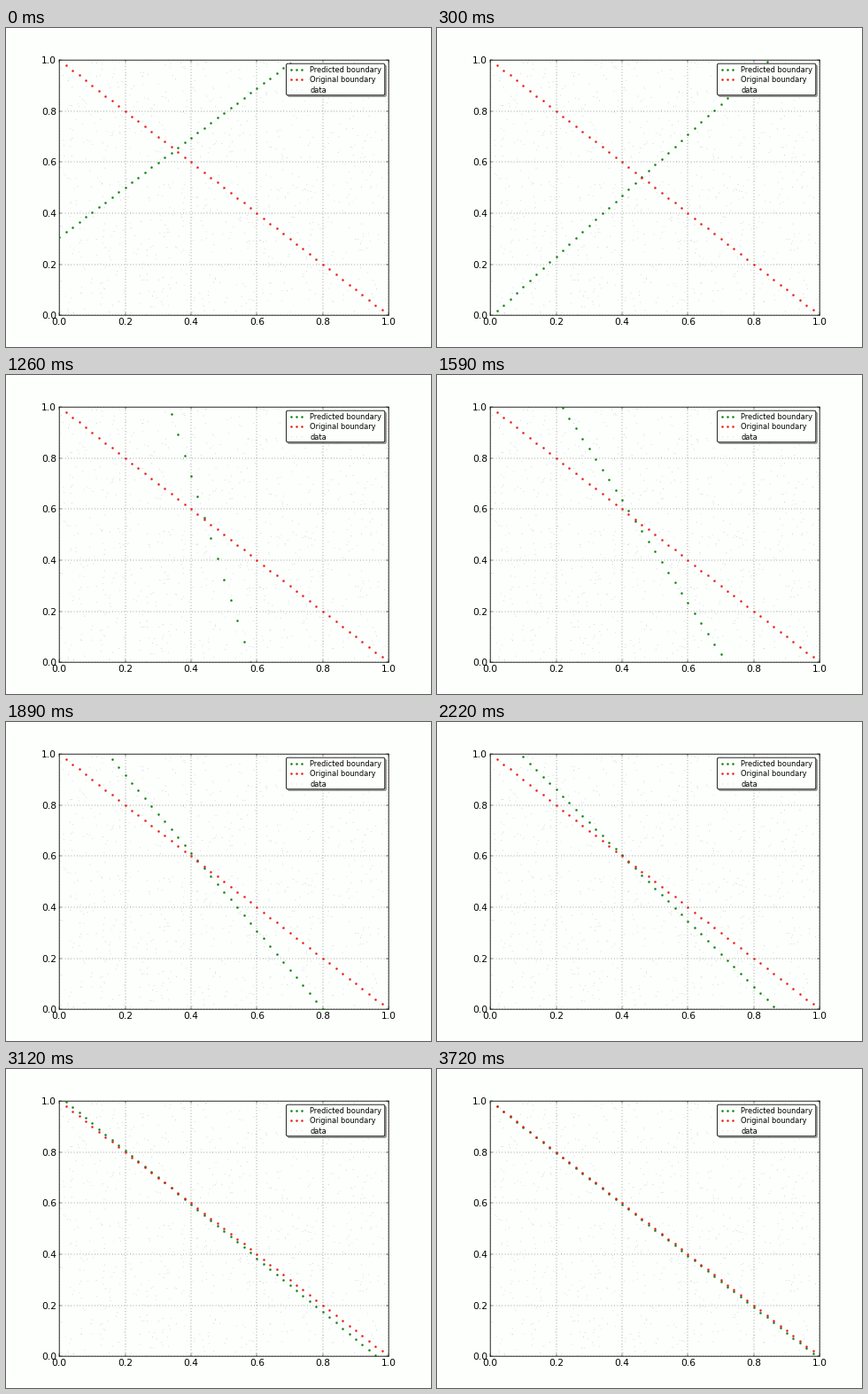
Animation of 480x360 px, one loop 3750 ms. Source, as a matplotlib script:

```python
import numpy as np
import matplotlib.pyplot as plt
from matplotlib.animation import FuncAnimation
from matplotlib.patches import FancyBboxPatch

plt.rcParams.update({
    "font.family": "DejaVu Sans",
    "lines.scale_dashes": False,
    "axes.linewidth": 1.0,
    "toolbar": "None",
})

W, H, DPI = 480, 360, 60
FRAMES, INTERVAL = 125, 30
PAPER = "#fdfffc"
GREEN, RED, PALE_BLUE = "#0a7f0c", "#ec1616", "#b8b8f0"
DOT = dict(linestyle="none", marker=".", markersize=4.8, markeredgewidth=0.5)

# Boundary bias + x + tilt * y = 0, sampled at a few steps of the training
STEPS = np.array([0, 10, 28, 53, 74, 104, 124.0])
BIAS = np.array([0.316, -0.006, -0.359, -0.7155, -0.869, -0.964, -0.991])
TILT = np.array([-1.029, -0.838, -0.1664, 0.497, 0.7776, 0.947, 0.992])

rng = np.random.default_rng(7)


def smooth(t, values):
    """Cubic Hermite curve through the sampled steps."""
    slopes = np.gradient(values, STEPS, edge_order=2)
    i = min(np.searchsorted(STEPS, t, side="right") - 1, len(STEPS) - 2)
    h = STEPS[i + 1] - STEPS[i]
    u = (t - STEPS[i]) / h
    return ((2 * u**3 - 3 * u**2 + 1) * values[i]
            + (u**3 - 2 * u**2 + u) * h * slopes[i]
            + (3 * u**2 - 2 * u**3) * values[i + 1]
            + (u**3 - u**2) * h * slopes[i + 1])


def specks(ax, x, y):
    sizes = rng.uniform(0.7, 1.2, len(x))
    ax.scatter(x, y, s=sizes, color=PALE_BLUE, linewidths=0, zorder=2)


def box(ax, x, y, w, h, **style):
    ax.add_patch(FancyBboxPatch(
        (x, y), w, h, boxstyle="round,pad=0,rounding_size=1.7", **style))


def draw_legend(fig):
    ax = fig.add_axes([0, 0, 1, 1], zorder=5)
    ax.set(xlim=(0, W), ylim=(H, 0))
    ax.axis("off")
    box(ax, 318.2, 41.9, 111.3, 35.6, facecolor="0.3", edgecolor="0.3",
        alpha=0.5, linewidth=1, zorder=0)
    box(ax, 316.5, 40.2, 111.3, 35.6, facecolor=PAPER, edgecolor="black",
        linewidth=1, zorder=1)

    xs = np.linspace(322.4, 334.1, 3)
    labels = ("Predicted boundary", "Original boundary", "data")
    for row, (label, color) in enumerate(zip(labels, (GREEN, RED, None))):
        y = 46.8 + 11.6 * row
        if color:
            ax.plot(xs, [y] * 3, color=color, zorder=2, **DOT)
        else:
            specks(ax, xs, [y] * 3)
        ax.text(343.2, y + 3, label, fontsize=9.9, va="baseline", zorder=3)


fig = plt.figure(figsize=(W / DPI, H / DPI), dpi=DPI, facecolor=PAPER)
# A slight offset keeps the unsnapped frame lines soft
ax = fig.add_axes([60.2 / W, 35.8 / H, 372 / W, 288 / H], facecolor=PAPER)
ax.set(xlim=(0, 1), ylim=(0, 1))
for spine in ax.spines.values():
    spine.set_snap(False)
ticks = np.linspace(0, 1, 6)
ax.set_xticks(ticks)
ax.set_yticks(ticks)
ax.tick_params(direction="in", length=4, width=0.5, pad=3.6,
               labelsize=12.8, top=True, right=True)
ax.set_axisbelow(False)
ax.grid(True, color="black", linewidth=0.5, linestyle=(0, (1, 3)))

specks(ax, *rng.random((2, 900)))

x = np.arange(50) * 0.02
predicted, = ax.plot(x, x, color=GREEN, zorder=3, **DOT)
ax.plot(x[1:], 1 - x[1:], color=RED, zorder=4, **DOT)
draw_legend(fig)


def update(n):
    predicted.set_ydata(-(smooth(n, BIAS) + x) / smooth(n, TILT))
    return predicted,


anim = FuncAnimation(fig, update, frames=FRAMES, interval=INTERVAL,
                     repeat=True, repeat_delay=0, blit=False)
plt.show()
```
